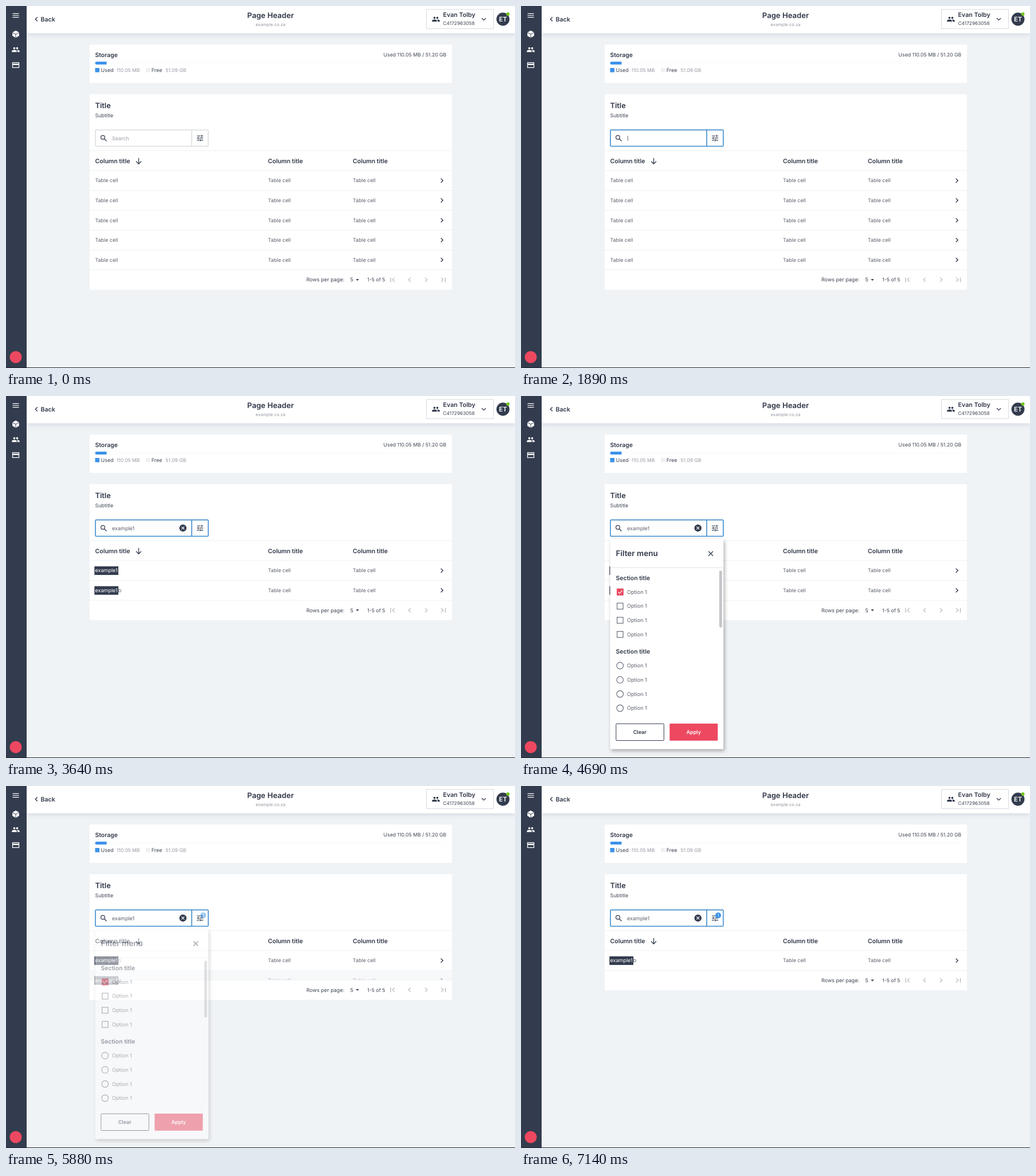
These frames come from a looping animation (888x631 px, 7210 ms). An HTML page:

```html
<!DOCTYPE html>
<html lang="en">
<head>
<meta charset="utf-8">
<title>Search and filter table</title>
<style>
  html, body { margin: 0; width: 100%; height: 100%; overflow: hidden; }
  svg { display: block; width: 888px; height: 631px; font-family: Inter, "Open Sans", sans-serif; text-rendering: geometricPrecision; }
  text { fill: #5b606b; white-space: pre; }
  .bold { font-weight: 600; fill: #303748; }
  .dark { fill: #3e4553; }
  .pale { fill: #959aa2; }
  .white { fill: #fff; }
  .header { filter: drop-shadow(0 2px 5px rgba(60, 80, 130, .17)); }
  .menu { filter: drop-shadow(2px 3px 3px rgba(0, 0, 0, .32)); }
</style>
</head>
<body>
<svg id="stage" viewBox="0 0 888 631"></svg>
<script>
const LOOP = 7210, STEP = 70;
const NAVY = '#333c4e', BLUE = '#3d93ea', FOCUS = '#3b8ccf', RED = '#ee4860';
const ROW_TOP = 286.9, ROW = 34.6;

const text = (x, y, string, size, cls = '', anchor = 'start') =>
  `<text x="${x}" y="${y}" font-size="${size}" class="${cls}" text-anchor="${anchor}">${string}</text>`;
const rect = (x, y, w, h, fill, extra = '') =>
  `<rect x="${x}" y="${y}" width="${w}" height="${h}" fill="${fill}" ${extra}/>`;
const group = (id, content, extra = '') => `<g id="${id}" ${extra}>${content}</g>`;
const rule = y => rect(146, y - .5, 632, 1, '#eef0f2');
const stroke = (d, color = NAVY, width = 1.3) =>
  `<path d="${d}" fill="none" stroke="${color}" stroke-width="${width}"/>`;

// Icons live on a 24-unit grid and are centred at x, y.
const icon = (content, x, y, color = NAVY, scale = .617) =>
  `<g transform="translate(${x} ${y}) scale(${scale}) translate(-12 -12)" fill="${color}" stroke="none">${content}</g>`;
const glyph = d => `<path d="${d}"/>`;
const line = (d, color, width = 2) => stroke(d, color, width);

const PEOPLE = glyph('M16 11a3 3 0 1 0 0-6a3 3 0 0 0 0 6zM8 11a3 3 0 1 0 0-6a3 3 0 0 0 0 6z' +
  'M8 13c-2.33 0-7 1.17-7 3.5V19h14v-2.5C15 14.17 10.33 13 8 13zM16 13l-.97.05c1.16.84 1.97 1.97 1.97 3.45V19h6v-2.5c0-2.33-4.67-3.5-7-3.5z');
const TUNE = glyph('M3 17v2h6v-2zM3 5v2h10V5zM13 21v-2h8v-2h-8v-2h-2v6zM7 9v2H3v2h4v2h2V9zM21 13v-2H11v2zM15 9h2V7h4V5h-4V3h-2z');
const CUBE = glyph('M12 2L21.5 7V17L12 22.5L2.5 17V7z') + line('M2.5 7.5L12 12.3L21.5 7.5M12 12.3V23', NAVY, 1.5);
const CARD = line('M3 5H21V19H3z', '#fff') + rect(3, 8, 18, 4, '#fff');

const chevron = (x, y, dir, color = NAVY, width = 1.4) =>
  stroke(`M${x - 1.8 * dir} ${y - 3.5}l${3.5 * dir} 3.5l${-3.5 * dir} 3.5`, color, width);

function sidebar() {
  return rect(0, 0, 36, 631, NAVY) +
    icon(glyph('M3 18h18v-2H3zM3 13h18v-2H3zM3 6v2h18V6z'), 17, 16.5, '#fff') +
    icon(CUBE, 17, 49, '#fff') + icon(PEOPLE, 17, 76, '#fff') + icon(CARD, 17, 103, '#fff') +
    `<circle cx="17" cy="612" r="10.5" fill="${RED}"/>`;
}

function header() {
  return rect(36, 0, 852, 47.5, '#fff', 'class="header"') +
    chevron(53, 23, -1) + text(60.5, 26.7, 'Back', 10.6, 'bold') +
    text(461.5, 21, 'Page Header', 13.1, 'bold', 'middle') +
    text(461.5, 35.4, 'example.co.za', 7.6, 'pale', 'middle') +
    rect(733.5, 6, 117, 33.5, '#fff', 'stroke="#d8dadf"') +
    icon(PEOPLE, 750, 23) +
    text(762.5, 19.4, 'Evan Tolby', 10.7, 'bold') + text(762.5, 33.4, 'C4172963058', 8.3, 'dark') +
    stroke('M830 21.2l3.5 3.5l3.5 -3.5') +
    `<circle cx="867" cy="23" r="11.4" fill="${NAVY}"/>` +
    text(867, 27, 'ET', 11.2, 'bold white', 'middle').replace('<text', '<text style="fill:#fff"') +
    '<circle cx="875.6" cy="14" r="2.9" fill="#72c81e"/>';
}

function storage() {
  return rect(146, 67.3, 632, 66.7, '#fff', 'rx="1"') +
    text(155.5, 88.5, 'Storage', 10.4, 'bold') +
    text(768.3, 88, 'Used 110.05 MB / 51.20 GB', 8.7, 'dark', 'end') +
    rect(160, 97, 608, 5, '#fdfdfd', 'rx="2.5"') +
    `<path d="M175.5 97h-17.5a2.5 2.5 0 0 0 0 5h17.5z" fill="${BLUE}"/>` +
    rect(155.5, 108, 7.5, 7.5, BLUE) + text(165.5, 115.2, 'Used', 9, 'dark') +
    text(192.7, 115.2, '110.05 MB', 8.6, 'pale') +
    rect(244, 108, 7.5, 7.5, '#f0f0f1') + text(253.7, 115.2, 'Free', 9, 'dark') +
    text(278.3, 115.2, '51.09 GB', 8.6, 'pale');
}

function tableHead() {
  return rect(146, 153.7, 632, ROW_TOP - 153.7, '#fff', 'rx="1"') +
    text(155.5, 178, 'Title', 12.8, 'bold') + text(155.5, 193.8, 'Subtitle', 8.9, 'dark') +
    rule(252.2) +
    [155.5, 457, 605].map(x => text(x, 273.8, 'Column title', 10.5, 'bold')).join('') +
    stroke('M231.5 265v10M227 270.8l4.5 4.5l4.5 -4.5');
}

function row(i) {
  const top = ROW_TOP + i * ROW, base = top + 20.5;
  return group('row' + i,
    rect(146, top, 632, ROW, '#fff') + rule(top) +
    group('cell' + i, text(155.5, base, 'Table cell', 8.9)) +
    text(457, base, 'Table cell', 8.9) + text(605, base, 'Table cell', 8.9) +
    chevron(760.5, top + 17.3, 1));
}

function tag(i, suffix) {
  const y = ROW_TOP + i * ROW;
  return group('tag' + i, rect(154.3, y + 10, 41.7, 15, NAVY) + text(155.5, y + 20.5, 'example1', 9, 'white') + suffix(y + 20.5));
}

function footer() {
  const grey = '#b3b6bc';
  return group('footer', rect(146, 0, 632, ROW, '#fff', 'rx="1"') + rule(0) +
    text(524, 20.5, 'Rows per page:', 9, 'dark') + text(600.5, 20.5, '5', 9, 'dark') +
    `<path d="M610.3 16h5.6l-2.8 3z" fill="${NAVY}"/>` + text(630.3, 20.5, '1-5 of 5', 8.7, 'dark') +
    stroke('M671 13.5v8', grey) + chevron(676, 17.3, -1, grey, 1.2) +
    chevron(704, 17.3, -1, grey, 1.2) + chevron(733, 17.3, 1, grey, 1.2) +
    chevron(761, 17.3, 1, grey, 1.2) + stroke('M766.5 13.5v8', grey));
}

function searchBox() {
  const frame = (color, width) =>
    rect(156, 216, 196.8, 28.4, 'none', `rx="1" stroke="${color}" stroke-width="${width}"`) + stroke('M324 216v28.4', color, width);
  return rect(155.5, 215.5, 197.5, 29.5, '#fff') + frame('#c8cbd0', 1) +
    group('focus', frame(FOCUS, 1.5)) +
    icon('<circle cx="9.5" cy="9.5" r="5.5" fill="none" stroke="#333c4e" stroke-width="2"/>' + line('M13.5 13.5L20 20', NAVY, 2.2), 170.5, 230.5) +
    group('placeholder', text(185, 233.5, 'Search', 8.9, 'pale')) +
    group('cursor', rect(185.8, 226.3, .9, 8.4, '#4a505c')) +
    group('query', text(185, 233.5, 'example1', 9) +
      `<circle cx="308.7" cy="230.2" r="6.2" fill="${NAVY}"/>` + stroke('M306.2 227.7l5 5M311.2 227.7l-5 5', '#fff', 1.2)) +
    icon(TUNE, 338.5, 230.2) +
    group('badge', `<circle cx="344" cy="225.5" r="5" fill="${BLUE}"/>` + text(344, 228, '1', 7, 'white', 'middle'));
}

function filterMenu() {
  const option = (y, mark) => mark + text(185, y + 3.2, 'Option 1', 9.1);
  const box = y => rect(167.6, y - 5.2, 10.5, 10.5, '#fff', 'stroke="#6b717d" stroke-width="1.2"');
  const radio = y => `<circle cx="172.8" cy="${y}" r="5.8" fill="#fff" stroke="#6b717d" stroke-width="1.2"/>`;
  const list = (start, mark) => [0, 1, 2, 3].map(i => option(start + i * 24.7, mark(start + i * 24.7))).join('');
  return group('menu',
    rect(155.5, 250, 197.7, 365.5, '#fff', 'class="menu"') +
    text(165.5, 279.3, 'Filter menu', 13.5, 'bold') + stroke('M327 270.8l8 8M335 270.8l-8 8') +
    rect(155.5, 298.6, 197.7, 1, '#dfe1e4') + rect(345.8, 304.5, 5, 99, '#c5c6c9', 'rx="2"') +
    text(165.5, 320.6, 'Section title', 10.4, 'bold') + list(341.5, box) +
    group('check', rect(167, 335.7, 11.7, 11.7, RED, 'rx="1"') + stroke('M169.4 341.6l2.5 2.5l4.6 -4.8', '#fff')) +
    text(165.5, 449.1, 'Section title', 10.4, 'bold') + list(470, radio) +
    rect(165.8, 571.3, 83.5, 29.2, '#fff', `rx="1" stroke="${NAVY}"`) + text(207.3, 589.2, 'Clear', 9, 'bold', 'middle') +
    rect(259.3, 571, 84, 29.7, RED, 'rx="1"') +
    `<g font-weight="600">${text(301.3, 589.2, 'Apply', 9, 'white', 'middle')}</g>`);
}

const stage = document.getElementById('stage');
stage.innerHTML =
  rect(0, 0, 888, 631, '#f0f3f6') + header() + sidebar() + storage() + tableHead() +
  [0, 1, 2, 3, 4].map(row).join('') + footer() +
  tag(0, y => group('suffix', text(195.7, y, 'b', 9))) + tag(1, y => text(195.7, y, 'b', 9)) +
  searchBox() + filterMenu() + rect(0, 630, 888, 1, '#20242c');

const parts = Object.fromEntries([...stage.querySelectorAll('[id]')].map(el => [el.id, el]));
const fade = (t, start, length) => Math.min(1, Math.max(0, (t - start) / length));
const mix = (a, b, p) => a + (b - a) * p;

function draw(t) {
  const focus = fade(t, 840, 210);
  const typed = fade(t, 2471, 300);
  const checked = fade(t, 4480, 210);
  const applied = fade(t, 5727, 293);
  const opacity = {
    focus, placeholder: 1 - focus, cursor: focus * (1 - typed), query: typed,
    cell0: 1 - typed, cell1: 1 - typed, row1: 1 - applied,
    row2: 1 - typed, row3: 1 - typed, row4: 1 - typed,
    tag0: typed, tag1: typed * (1 - applied), suffix: applied,
    menu: t < 3710 ? 0 : 1 - applied, check: checked, badge: applied
  };
  for (const id in opacity) parts[id].setAttribute('opacity', opacity[id]);
  const rows = mix(mix(5, 2, typed), 1, applied);
  parts.footer.setAttribute('transform', `translate(0 ${ROW_TOP + rows * ROW})`);
}

const began = performance.now();
function tick() {
  const t = (performance.now() - began) % LOOP;
  draw(Math.floor(t / STEP) * STEP);
  requestAnimationFrame(tick);
}
tick();
</script>
</body>
</html>
```
